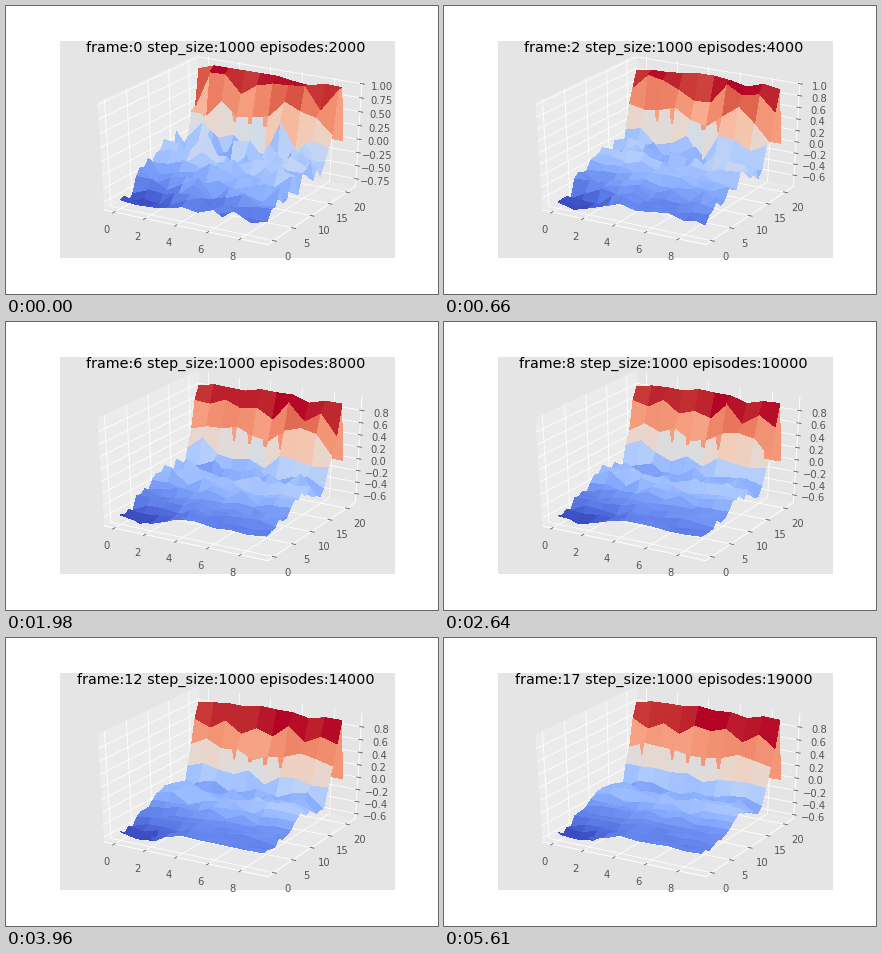
A matplotlib script that plays this animation: 432 px wide and 288 px high, repeating every 5.94 s.

```python
import numpy as np
import matplotlib.pyplot as plt
from matplotlib.animation import FuncAnimation

FRAMES, INTERVAL = 18, 330
WIDTH, HEIGHT, DPI = 432, 288, 72
COLS, ROWS = 10, 22
RIDGE = 20

plt.rcParams.update({
    "font.family": "DejaVu Sans", "font.size": 10, "text.kerning_factor": 6,
    "axes.facecolor": "#E5E5E5", "axes.edgecolor": "white",
    "axes.linewidth": 1, "grid.color": "white", "grid.linewidth": 0.8,
    "xtick.color": "#555555", "ytick.color": "#555555",
})

X, Y = np.meshgrid(np.arange(COLS), np.arange(ROWS))

# Each estimate is a running mean, so its error shrinks as samples add up.
rng = np.random.default_rng(7)
spread = np.interp(Y, [0, 8, 13, 19, RIDGE], [.10, .15, .22, .28, .07])
samples = rng.normal(size=(FRAMES, ROWS, COLS)) * spread
errors = samples.cumsum(axis=0) / np.arange(1, FRAMES + 1)[:, None, None]


def value_range(n):
    low = np.interp(n, [0, 2, 8, 12, 17], [-.86, -.77, -.695, -.65, -.63])
    high = np.interp(n, [4, 6], [1, .97])
    return low, high


def surface(n):
    low, high = value_range(n)
    ridge = 0.89 + 0.008 * X[0].mean() + 0.1 * np.exp(-n / 2)
    # Gentle hump, a shallow trough, then a steep climb to the ridge.
    profile = np.interp(Y, [0, 6, 10, 15, 16, 17, RIDGE],
                        [0.66 * low, -.38, -.14, -.29, -.26, .01, ridge])
    slope = 0.008 * (X - X.mean())
    pit = 0.34 * low * np.exp(-((X - 1) ** 2 + (Y - 1) ** 2) / 2.5)
    z = np.clip(profile + slope + pit + errors[n], low, high)
    z[RIDGE + 1:] = 0
    return z, low, high


def padded(low, high):
    pad = (high - low) / 48
    return low - pad, high + pad


fig = plt.figure(figsize=(WIDTH / DPI, HEIGHT / DPI), dpi=DPI, facecolor="white")
ax = fig.add_axes([0.125, 0.125, 0.775, 0.755], projection="3d")
ax.view_init(elev=30, azim=-60)
# A cubic box stretched over the whole axes rectangle.
ax.set_box_aspect((1, 1, 1), zoom=np.sqrt(3) / 1.8294640721620434)
ax.apply_aspect = lambda position=None: None
title = fig.text(0, 242 / HEIGHT, "", size=14.4, ha="left",
                 va="baseline", color="black")


def draw(n):
    for item in list(ax.collections):
        item.remove()
    z, low, high = surface(n)
    ax.plot_surface(X, Y, z, rstride=1, cstride=1, cmap="coolwarm",
                    linewidth=0, antialiased=False)
    step = 0.25 if high - low > 1.85 else 0.2
    first, last = np.ceil(low / step), np.floor(high / step + 1e-9)
    ax.set_xticks(range(0, 10, 2))
    ax.set_yticks(range(0, 21, 5))
    ax.set_zticks(np.round(np.arange(first, last + 1) * step, 2))
    ax.set_xlim(*padded(-0.45, 9.45))
    ax.set_ylim(*padded(-1.05, 22.05))
    ax.set_zlim(*padded(low, high))
    text = f"frame:{n} step_size:1000 episodes:{2000 + 1000 * n}"
    title.set_text(text)
    # Each extra digit moves the centred title left by half its width.
    title.set_x((80 - 4.55 * (len(text) - 36)) / WIDTH)
    return []


anim = FuncAnimation(fig, draw, frames=FRAMES, interval=INTERVAL,
                     repeat=True, repeat_delay=0)
plt.show()
```
